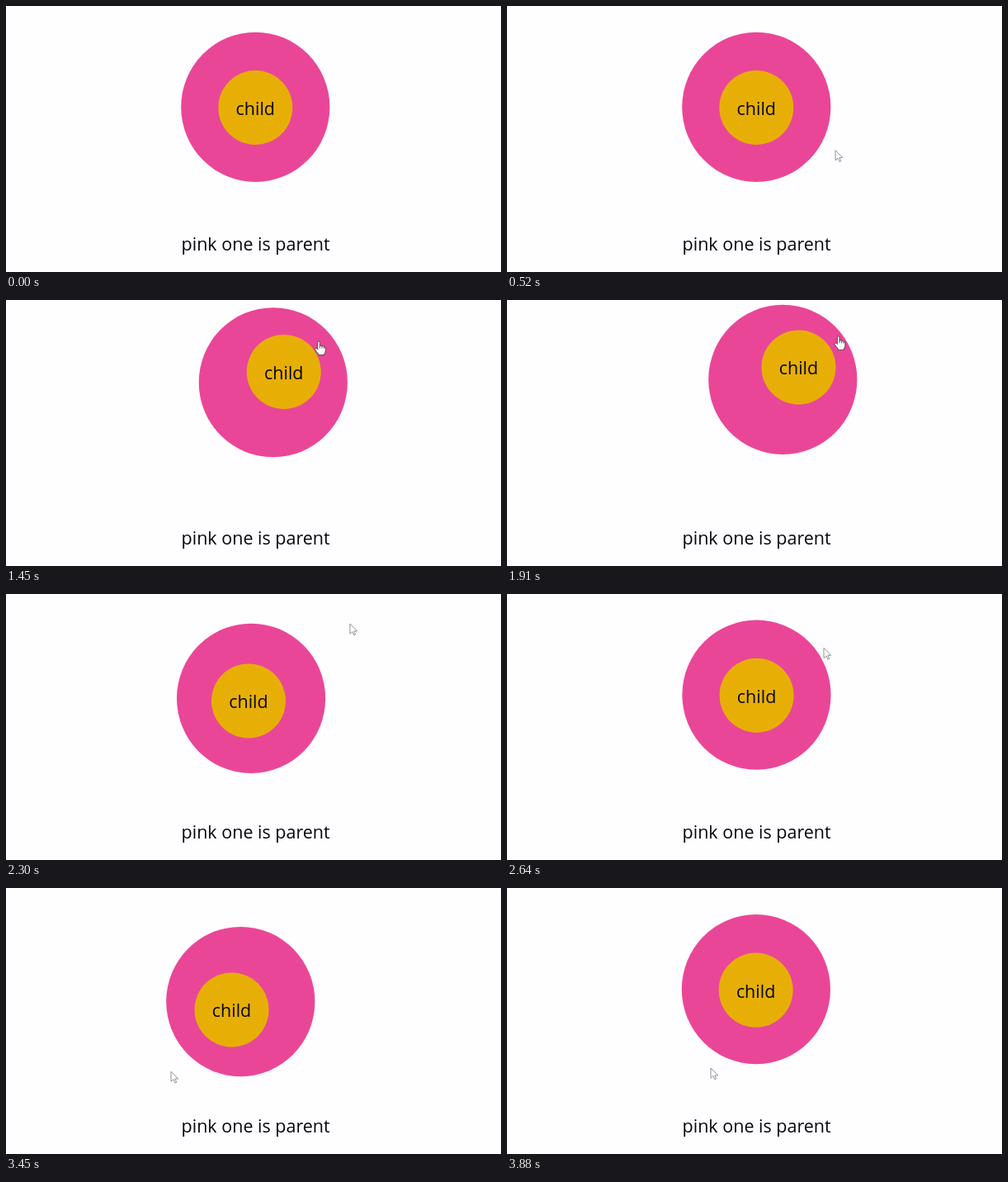
These frames come from a looping animation (600 px wide and 322 px high, 3.91 s). An HTML page:

```html
<!DOCTYPE html>
<html lang="en">
<head>
<meta charset="utf-8">
<title>Magnetic circles</title>
<style>
  html, body { margin: 0; width: 100%; height: 100%; overflow: hidden; background: #fefdff; }
  svg { display: block; width: 600px; height: 322px; }
  text { font: 21.5px "Open Sans", "Noto Sans", sans-serif; text-anchor: middle; fill: #08080c; }
  #arrow, #hand { fill: #fff; stroke: #777; stroke-width: .8; stroke-linejoin: round; }
  #hand { stroke: #333; }
</style>
</head>
<body>
<svg viewBox="0 0 600 322">
  <ellipse id="parent" cx="302.3" cy="122.3" rx="90.1" ry="90.6" fill="#ea4698"/>
  <g id="child">
    <circle cx="302.3" cy="123" r="45" fill="#e7af06"/>
    <text x="302.3" y="132">child</text>
  </g>
  <text x="302.6" y="295.7">pink one is parent</text>
  <path id="arrow" d="M0 0V12.2L2.9 9.6L4.9 13.8L6.7 13L4.8 8.9H8.7Z"/>
  <g id="hand">
    <path d="M-1.3 9V1.2Q-1.2 0 0 0Q1.2 0 1.3 1.2V5.4Q3.3 4.6 3.9 6Q5.8 5.3 6.3 6.8Q8.2 6.4 8.2 8.4V11.5Q8 13.6 6.8 15V16.6H-.5V15.2Q-2.6 13 -4.6 9.8Q-4.9 8.2 -3.4 8.2Q-2.4 8.4 -1.3 9.8Z"/>
    <path d="M1.3 5.4V8.4M3.9 6V8.6M6.3 6.8V8.8" fill="none"/>
  </g>
</svg>
<script>
const LOOP = 3910, STEP = 5, LAG = 100, PULL = 1 / 3;
const CENTER = [302.3, 122.3];
const $ = id => document.getElementById(id);

// Turning points of the pointer: [time, x, y]
const path = [
  [30, 562, 284], [740, 310, 112], [910, 302, 85], [1450, 379, 50],
  [2100, 408.5, 42], [2300, 417, 36], [2750, 364, 80], [2970, 272, 136],
  [3250, 210, 196], [3390, 198, 216], [3450, 200, 222], [3650, 206, 244], [3880, 247, 218]
];

const hovers = [
  { from: 565, to: 2106, back: 1000 },
  { from: 2665, to: 3404, back: 1300 }
];

function slope(i, k) {
  const a = path[i - 1], b = path[i + 1];
  return a && b ? (b[k] - a[k]) / (b[0] - a[0]) : 0;
}

// Smooth curve through the turning points
function pointer(t) {
  if (t <= path[0][0]) return path[0].slice(1);
  const i = path.findIndex(p => p[0] > t) - 1;
  if (i < 0) return path.at(-1).slice(1);
  const a = path[i], b = path[i + 1], d = b[0] - a[0], u = (t - a[0]) / d, v = 1 - u;
  return [1, 2].map(k =>
    v * v * ((1 + 2 * u) * a[k] + u * d * slope(i, k)) +
    u * u * ((1 + 2 * v) * b[k] - v * d * slope(i + 1, k)));
}

// Elastic return from 1 to 0
const spring = u => u >= 1 ? 0 : -(2 ** (-10 * u)) * Math.sin((u - .075) * 2 * Math.PI / .3);

// The circles trail behind the pointer while it is over them
function follow(from, to) {
  let pos = [0, 0];
  for (let t = from; t < to; t += STEP) {
    const dt = Math.min(STEP, to - t), ease = 1 - Math.exp(-dt / LAG), at = pointer(t + dt);
    pos = pos.map((p, k) => p + ((at[k] - CENTER[k]) * PULL - p) * ease);
  }
  return pos;
}

function offset(t, hover) {
  if (!hover) return [0, 0];
  const { from, to, back } = hover;
  const pos = follow(from, Math.min(t, to));
  return t < to ? pos : pos.map(p => p * spring((t - to) / back));
}

function move(id, x, y) {
  $(id).setAttribute("transform", `translate(${x.toFixed(2)} ${y.toFixed(2)})`);
}

function draw(t) {
  const hover = hovers.findLast(h => t >= h.from);
  const over = !!hover && t < hover.to;
  const [x, y] = offset(t, hover);
  move("parent", x, y);
  move("child", x * 1.6, y * 1.6);

  const at = pointer(t);
  move("arrow", ...at);
  move("hand", ...at);
  $("arrow").style.display = t >= path[0][0] && !over ? "" : "none";
  $("hand").style.display = over ? "" : "none";
}

const start = performance.now();
function tick() {
  draw((performance.now() - start) % LOOP);
  requestAnimationFrame(tick);
}
tick();
</script>
</body>
</html>
```
